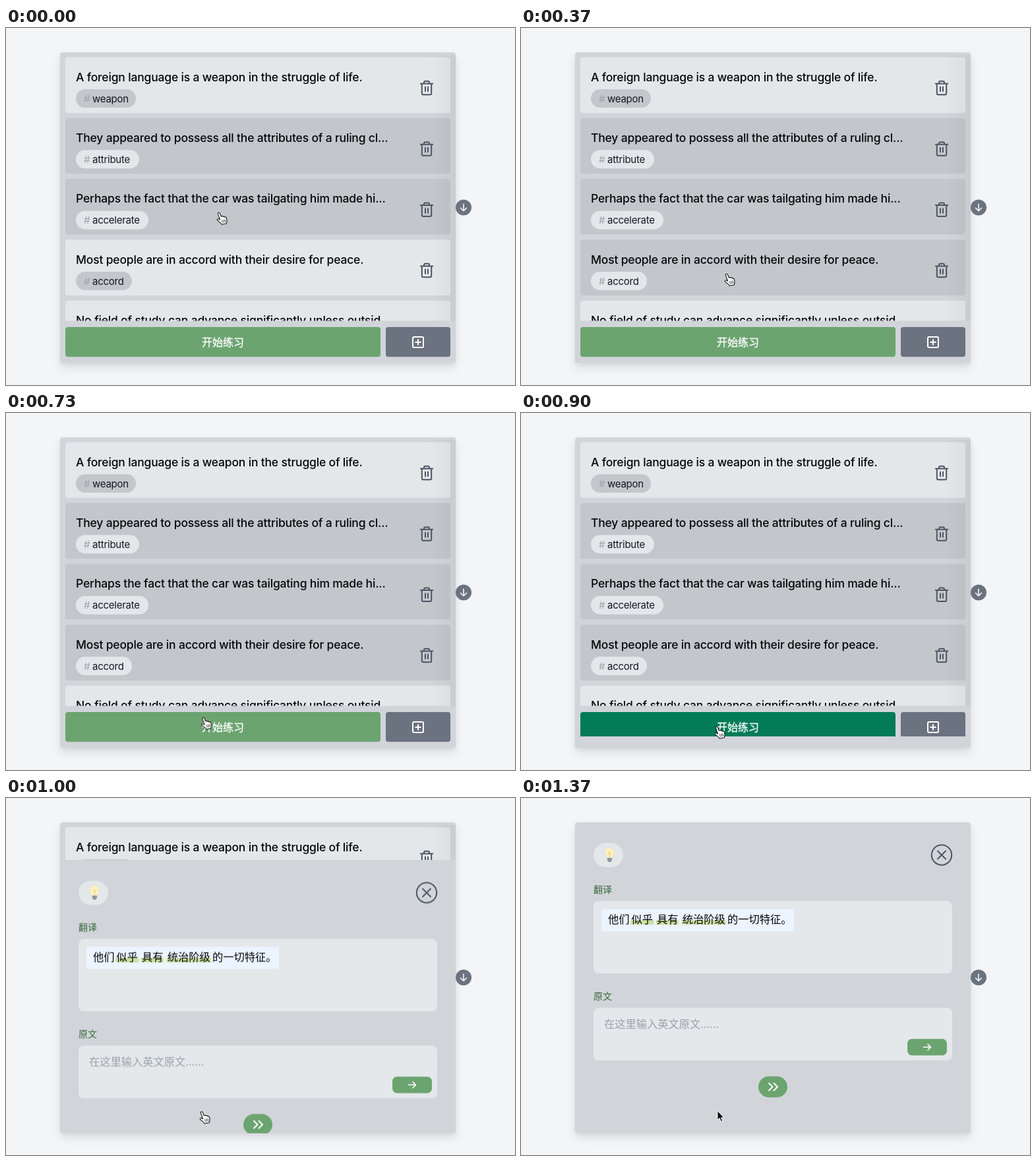
Recreate the animation shown at these times as an HTML page. Size 772 px wide and 542 px high, loop 1.86 s.

```html
<!DOCTYPE html>
<html lang="zh-CN">
<head>
<meta charset="utf-8">
<title>Sentence practice</title>
<style>
  html, body { margin: 0; width: 100%; height: 100%; overflow: hidden; background: #f3f5f7; }
  svg { display: block; width: 772px; height: 542px; }
  text { font-family: Inter, "Noto Sans CJK SC", "Noto Sans CJK", sans-serif; white-space: pre; }
  .title { font-size: 17.5px; font-weight: 500; letter-spacing: -.18px; fill: #050608; }
  .tag { font-size: 15px; letter-spacing: -.25px; fill: #15181e; }
  .hash { fill: #9ca3af; }
  .zh { font-family: "Noto Sans CJK SC", "Noto Sans CJK", sans-serif; font-size: 16.25px; }
  .label { font-size: 14px; fill: #37663a; }
  .hint { fill: #9aa1ab; }
  .line { fill: none; stroke-width: 2; stroke-linecap: round; stroke-linejoin: round; }
  .ink { stroke: #4b5563; }
  .white { stroke: #fff; }
  .shadow { filter: drop-shadow(0 8px 7px rgba(0, 0, 0, .09)) drop-shadow(0 2px 3px rgba(0, 0, 0, .05)); }
</style>
</head>
<body>
<svg viewBox="0 0 772 542">
  <defs>
    <clipPath id="card"><rect x="82" y="37" width="600" height="471.5" rx="4"/></clipPath>
    <clipPath id="view"><rect x="90" y="44" width="584" height="400.5"/></clipPath>
    <radialGradient id="glow">
      <stop offset="0" stop-color="#ffe08c"/>
      <stop offset=".5" stop-color="#fdf2c0"/>
      <stop offset="1" stop-color="#f8f1cf"/>
    </radialGradient>
    <linearGradient id="shade">
      <stop offset="0" stop-opacity="0"/>
      <stop offset="1" stop-opacity=".04"/>
    </linearGradient>
    <g id="trash" class="line ink">
      <path d="M-9.2 -6.6H9.2M7.2 -6.6V8.3A2 2 0 0 1 5.2 10.3H-5.2A2 2 0 0 1 -7.2 8.3V-6.6M-4 -6.6V-8.2A2 2 0 0 1 -2 -10.2H2A2 2 0 0 1 4 -8.2V-6.6M-2 -1.5V5M2 -1.5V5"/>
    </g>
  </defs>

  <rect class="shadow" x="82" y="37" width="600" height="471.5" rx="4" fill="#d1d5da"/>
  <g id="list" clip-path="url(#view)"></g>
  <rect x="642" y="41" width="40" height="404" fill="url(#shade)"/>

  <rect id="start" x="90" y="454" width="478" height="45.3" rx="4" fill="#6ca470"/>
  <text class="zh" x="329" y="483" text-anchor="middle" fill="#fff" stroke="#fff" stroke-width=".3" style="font-size:16px;font-weight:500">开始练习</text>
  <rect x="576" y="454" width="98" height="45.3" rx="4" fill="#6b7280"/>
  <g class="line white">
    <rect x="617" y="469" width="16" height="16" rx="2"/>
    <path d="M625 473.2V480.8M621.2 477H628.8"/>
  </g>

  <g clip-path="url(#card)">
    <g id="sheet">
      <rect x="82" y="37" width="600" height="472" fill="#d1d5da"/>
      <rect x="110" y="68.5" width="45" height="36.5" rx="18.2" fill="#e4e8ea"/>
      <path d="M130.6 91C130.4 88.5 127.1 87.3 127.1 82.8A7.3 7.3 0 0 1 141.7 82.8C141.7 87.3 138.4 88.5 138.2 91Z" fill="url(#glow)" stroke="#e5dcae" stroke-width=".6"/>
      <path d="M132.8 83.5L134.4 85.5L136 83.5M134.4 85.5V90.5" fill="none" stroke="#e3bd6c" stroke-width=".8"/>
      <path d="M130.9 91H137.9V94.6L136 97H132.8L130.9 94.6Z" fill="#80858a"/>
      <path d="M130.9 92.8H137.9M131.3 94.9H137.5" stroke="#b9bdc1" stroke-width=".7"/>
      <g class="line ink">
        <circle cx="638" cy="86.5" r="15.2"/>
        <path d="M632 80.5L644 92.5M644 80.5L632 92.5"/>
      </g>

      <text class="zh label" x="110" y="143.5">翻译</text>
      <rect x="110" y="156.5" width="544" height="110" rx="8" fill="#e4e8ea"/>
      <rect x="122" y="168.5" width="292" height="34" rx="3" fill="#ebf4ff"/>
      <g id="phrase"></g>

      <text class="zh label" x="110" y="305.5">原文</text>
      <rect x="110" y="318.5" width="544" height="80" rx="8" fill="#e4e8ea"/>
      <text class="zh hint" x="126" y="348.7">在这里输入英文原文<tspan font-family="Inter, sans-serif">......</tspan></text>
      <rect x="586" y="365.7" width="60" height="25" rx="7" fill="#6ca470"/>
      <path class="line white" style="stroke-width:1.6" d="M610.5 378.2H621.5M617 373.7L621.5 378.2L617 382.7"/>
      <rect x="360" y="422.5" width="44" height="32" rx="16" fill="#6ca470"/>
      <path class="line white" d="M376 433L381.5 438.5L376 444M383.5 433L389 438.5L383.5 444"/>
    </g>
  </g>

  <circle cx="694" cy="272.5" r="12" fill="#6b7280"/>
  <path class="line white" style="stroke-width:1.5" d="M694 267.3V277.7M689.5 273.2L694 277.7L698.5 273.2"/>

  <g id="hand" stroke="#111" stroke-width="1.1" stroke-linejoin="round" stroke-linecap="round">
    <path fill="#fff" d="M-5.4 -6.4C-6.5 -8.7 -3.5 -9.7 -2.6 -7.6L-.5 -2.7C.2 -3.9 2 -3.6 2.4 -2.3C3.2 -3.3 4.7 -2.7 5 -1.6C6 -2.3 7.2 -1.6 7.4 -.4L8 3C8.3 5 7.4 6 7.5 7.8L.2 9.2C-.7 7 -3.6 5.6 -6.2 3.2C-7.6 1.8 -6 .2 -4.5 .9L-2.4 2.1Z"/>
    <path fill="none" stroke-width=".8" d="M.6 2.8L1.4 6.3M2.9 2.3L3.6 5.9M5 1.9L5.7 5.4"/>
  </g>
  <path id="arrow" transform="translate(298 475)" fill="#0a0a0a" stroke="#fff" stroke-width="1" stroke-linejoin="round" d="M0 0V14L3.2 11L5.4 16.2L7.8 15.2L5.6 10.2H9.8Z"/>
</svg>

<script>
const LOOP = 1860, PITCH = 92.35;
const LIGHT = '#e4e7ea', DARK = '#c3c7cb';
const $ = id => document.getElementById(id);

// title, tag, pill width, selected
const rows = [
  ['A foreign language is a weapon in the struggle of life.', 'weapon', 91, false],
  ['They appeared to possess all the attributes of a ruling cl...', 'attribute', 96, true],
  ['Perhaps the fact that the car was tailgating him made hi...', 'accelerate', 110, true],
  ['Most people are in accord with their desire for peace.', 'accord', 85, false],
  ['No field of study can advance significantly unless outsid...', 'advance', 95, false]
];

$('list').innerHTML = rows.map(([title, tag, width, on], i) => `
  <g transform="translate(0 ${i * PITCH})">
    <rect id="row${i}" x="90" y="44.5" width="584" height="84.4" rx="4" fill="${on ? DARK : LIGHT}"/>
    <text class="title" x="106" y="80.8">${title}</text>
    <rect id="pill${i}" x="106" y="93" width="${width}" height="28" rx="14" fill="${on ? LIGHT : DARK}"/>
    <text class="tag" y="112.8"><tspan class="hash" x="118">#</tspan><tspan x="131">${tag}</tspan></text>
    <use href="#trash" x="638" y="91"/>
  </g>`).join('');

// text, x, width of the marker (0 for none)
$('phrase').innerHTML = [
  ['他们', 132, 0], ['似乎', 167.5, 35], ['具有', 206, 34],
  ['统治阶级', 244.8, 67], ['的一切特征。', 313, 0]
].map(([text, x, mark]) => `
  ${mark ? `<rect x="${x - 1}" y="185.3" width="${mark}" height="7" fill="#cbe0a0"/>` : ''}
  <text class="zh" x="${x}" y="189.9" fill="#050608">${text}</text>`).join('');

// steps: [ms, value, easing]; the last value holds to the end of the loop
function play(id, prop, steps) {
  const frames = steps.map(([ms, value, easing = 'linear']) =>
    ({ offset: ms / LOOP, [prop]: value, easing }));
  frames.push({ offset: 1, [prop]: steps[steps.length - 1][1] });
  $(id).animate(frames, { duration: LOOP, iterations: Infinity }).startTime = 0;
}

const HOLD = 'steps(1, end)';
const at = (x, y) => `translate(${x}px, ${y}px)`;

play('hand', 'transform', [
  [0, at(327, 289), HOLD],
  [20, at(327, 289), 'cubic-bezier(.4, 0, .4, 1)'],
  [365, at(316, 382), HOLD],
  [500, at(304, 467), HOLD],
  [570, at(304, 467)],
  [670, at(304, 468), 'ease-in-out'],
  [880, at(301, 485)]
]);
play('hand', 'opacity', [[0, 1, HOLD], [1370, 0]]);
play('arrow', 'opacity', [[0, 0, HOLD], [1370, 1]]);

play('row3', 'fill', [[0, LIGHT, HOLD], [330, DARK]]);
play('pill3', 'fill', [[0, DARK, HOLD], [330, LIGHT]]);
play('start', 'fill', [[0, '#6ca470'], [820, '#6ca470'], [880, '#037b57']]);

play('sheet', 'transform', [
  [0, 473], [900, 454], [930, 352], [970, 148], [1000, 57.3],
  [1030, 22], [1070, 5], [1100, 2], [1130, 0]
].map(([ms, y]) => [ms, at(0, y), HOLD]));
</script>
</body>
</html>
```
